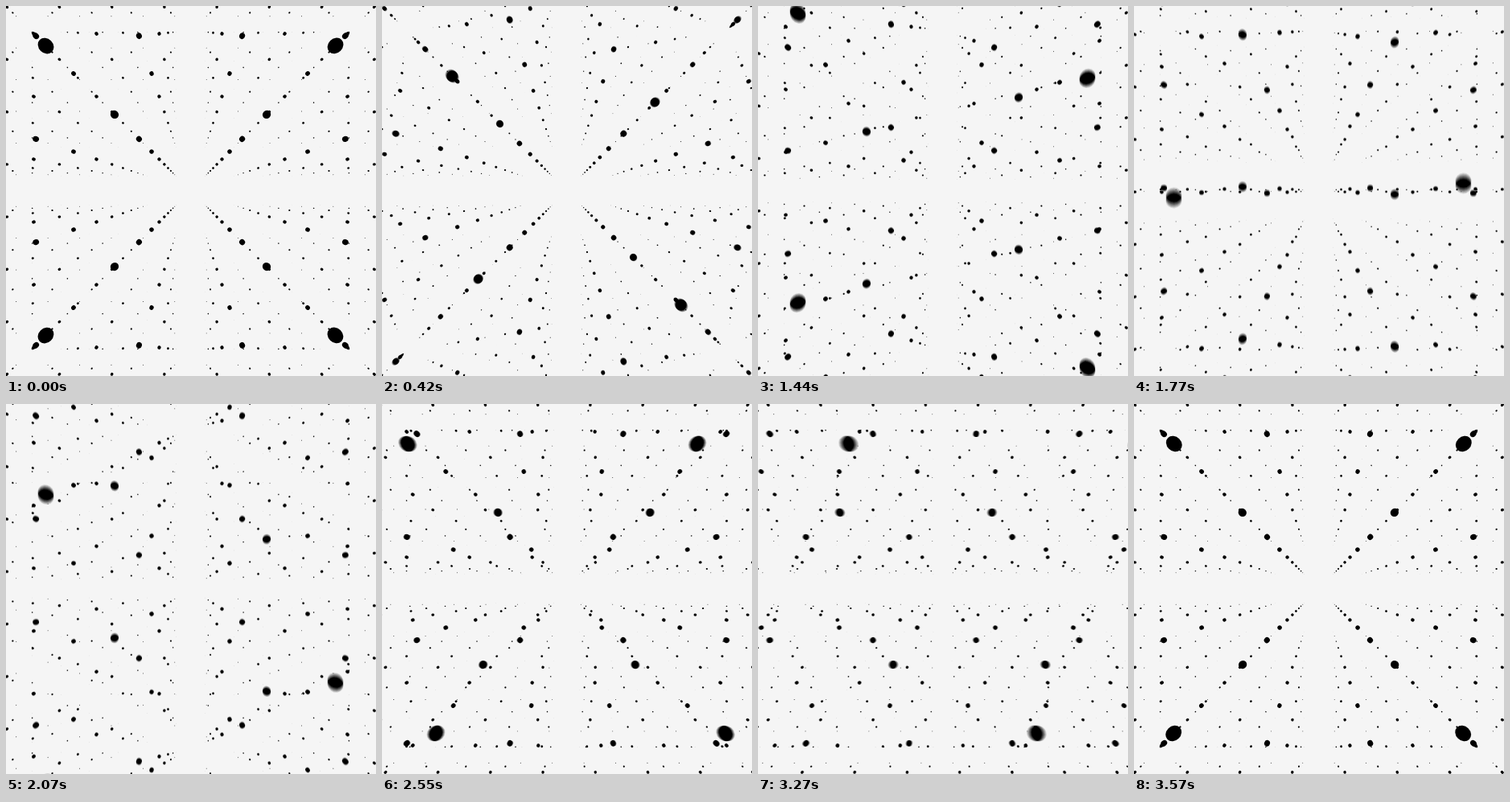
Recreate the animation shown at these times as an HTML page with a canvas. Size 460x460 px, loop 3600 ms.

```html
<!DOCTYPE html>
<html>
<head>
<meta charset="utf-8">
<style>
  html, body { margin: 0; width: 100%; height: 100%; overflow: hidden; background: #f5f5f5; }
  canvas { display: block; }
</style>
</head>
<body>
<canvas id="stage" width="460" height="460"></canvas>
<script>
const SIZE = 460, MID = 229.5;
const LOOP = 3600, PHASE = 1200, FRAME = 30;
const SHUTTER = 20, SAMPLES = 8;
const SPACING = 360;                                  // lattice cell in pixels
const FOCAL = SIZE / 2 / Math.tan(Math.PI / 6);       // 60 degree field of view
const NEAR = FOCAL / SPACING - 1;                     // depth of layer 0, in cells
const FAR = 11.6;

const stage = document.getElementById('stage').getContext('2d', { alpha: false });
const layer = document.createElement('canvas');
layer.width = layer.height = SIZE;
const ctx = layer.getContext('2d', { alpha: false });

const smooth = u => u * u * (3 - 2 * u);
const sign = n => n % 2 === 0 ? 1 : -1;

// Screen radius: perspective plus a thin outline, tapering off in the distance.
const radiusAt = z => (9.1 / z + 0.85) * (1 - (z / FAR) ** 2);

// Perspective outline of a ball; x, y and z are in cells.
function ball(x, y, z) {
  if (z < 0.6 || z >= FAR) return;
  const scale = FOCAL / z;
  const px = x * scale, py = y * scale;
  const minor = radiusAt(z);
  if (Math.max(Math.abs(px), Math.abs(py)) > SIZE / 2 + 2 * minor) return;
  const major = minor * Math.hypot(x, y, z) / z;
  const angle = Math.atan2(py, px);
  const cx = MID + px, cy = MID + py;
  ctx.moveTo(cx + major * Math.cos(angle), cy + major * Math.sin(angle));
  ctx.ellipse(cx, cy, major, minor, angle, 0, 2 * Math.PI);
}

// Neighbouring lines of balls slide in opposite directions: depth, then y, then x.
function drawLattice(time) {
  const t = time % LOOP;
  const axis = Math.floor(t / PHASE);
  const shift = smooth(t % PHASE / PHASE);
  ctx.fillStyle = '#f5f5f5';
  ctx.fillRect(0, 0, SIZE, SIZE);
  ctx.fillStyle = '#000';
  ctx.beginPath();
  for (let k = 0; k <= 12; k++) {
    const depth = k + NEAR;
    const reach = Math.ceil((depth + 1) * MID / FOCAL) + 2;
    for (let i = -reach; i < reach; i++) {
      for (let j = -reach; j < reach; j++) {
        const x = i + 0.5, y = j + 0.5;
        if (axis === 0) ball(x, y, depth + sign(i + j) * shift);
        else if (axis === 1) ball(x, y - sign(i + k) * shift, depth);
        else ball(x - sign(j + k) * shift, y, depth);
      }
    }
  }
  ctx.fill();
}

// Motion blur: running average of several moments within the shutter time.
function render(time) {
  for (let s = 0; s < SAMPLES; s++) {
    drawLattice(time + SHUTTER * (s + 0.5) / SAMPLES);
    stage.globalAlpha = 1 / (s + 1);
    stage.drawImage(layer, 0, 0);
  }
}

const start = performance.now();
let shown = 0;
function tick() {
  const elapsed = Math.max(0, performance.now() - start) % LOOP;
  const step = Math.floor(elapsed / FRAME);
  if (step !== shown) {
    shown = step;
    render(step * FRAME);
  }
  requestAnimationFrame(tick);
}
render(0);
requestAnimationFrame(tick);
</script>
</body>
</html>
```
